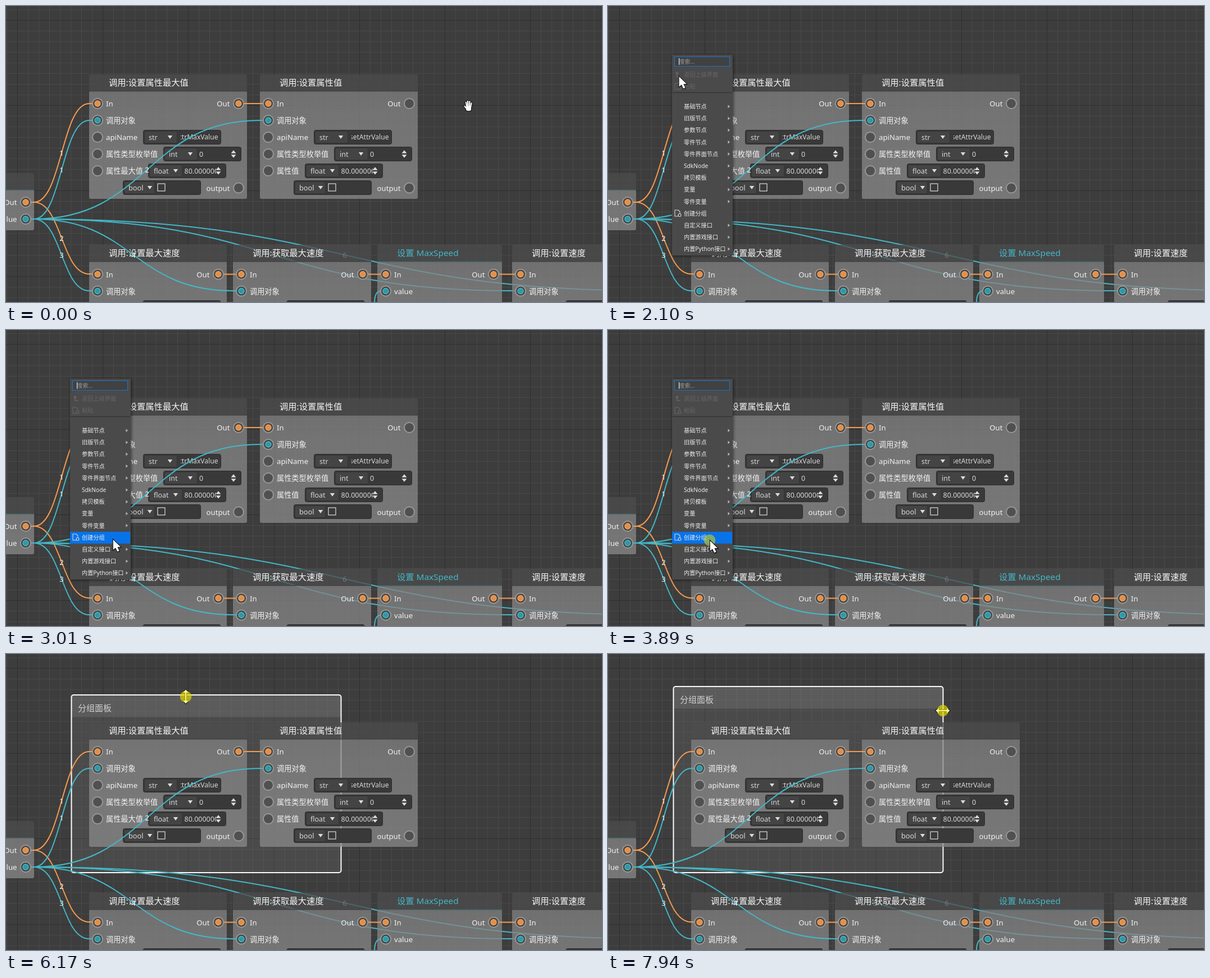
An HTML page with a canvas that plays this animation: 1061x528 px, repeating every 8 s.

```html
<!DOCTYPE html>
<html lang="zh-CN">
<head>
<meta charset="utf-8">
<style>
html, body { margin: 0; width: 100%; height: 100%; overflow: hidden; background: #3d3d3d; }
canvas { display: block; }
</style>
</head>
<body>
<canvas id="stage" width="1061" height="528"></canvas>
<script>
const W = 1061, H = 528, LOOP = 8000;
const ctx = document.getElementById('stage').getContext('2d');
const FONT = '"Noto Sans", "Noto Sans CJK SC", "Noto Sans CJK", sans-serif';
const ORANGE = '#f59b4f', TEAL = '#43b7c7';
const HEADER = 30;

// Cursor moves: start, end, number of steps, destination
const moves = [
  [70, 830, 11, 110, 72], [900, 970, 2, 108, 79], [1170, 1240, 2, 113, 85],
  [1570, 1570, 1, 114, 87], [2030, 2520, 8, 190, 330], [2590, 2800, 4, 188, 354],
  [2870, 3220, 6, 192, 392], [3290, 3360, 2, 181, 375], [4750, 5240, 7, 303, 77],
  [5310, 5440, 3, 308, 88], [5640, 5770, 2, 320, 89], [6030, 6170, 3, 320, 76],
  [6240, 6450, 4, 320, 61], [6520, 6790, 4, 323, 38], [7120, 7330, 4, 480, 112],
  [7400, 7610, 4, 596, 101]
];
const menuItems = ['基础节点', '旧版节点', '参数节点', '零件节点', '零件界面节点', 'SdkNode',
  '拷贝模板', '变量', '零件变量', '创建分组', '自定义接口', '内置游戏接口', '内置Python接口'];
const GROUP_ITEM = 9;

function cursorAt(t) {
  let x = 823, y = 178;
  for (const [start, end, steps, toX, toY] of moves) {
    if (t < start) break;
    const step = end > start ? Math.floor((t - start) / (end - start) * (steps - 1) + 1e-6) + 1 : steps;
    const p = Math.min(1, step / steps), e = p * p * (3 - 2 * p);
    x += (toX - x) * e;
    y += (toY - y) * e;
  }
  return { x, y };
}

function text(s, x, y, size = 13.2, color = '#f2f2f2', align = 'left') {
  ctx.font = `${size}px ${FONT}`;
  ctx.fillStyle = color;
  ctx.textAlign = align;
  ctx.fillText(s, x, y + size * 0.37);
}

function box(x, y, w, h, r, fill, stroke, line = 1) {
  ctx.beginPath();
  ctx.roundRect(x, y, w, h, r);
  if (fill) { ctx.fillStyle = fill; ctx.fill(); }
  if (stroke) { ctx.strokeStyle = stroke; ctx.lineWidth = line; ctx.stroke(); }
}

function disc(x, y, r, fill, stroke, line) {
  ctx.beginPath();
  ctx.arc(x, y, r, 0, Math.PI * 2);
  ctx.fillStyle = fill;
  ctx.fill();
  if (stroke) { ctx.strokeStyle = stroke; ctx.lineWidth = line; ctx.stroke(); }
}

function poly(points, fill, stroke, line = 1) {
  ctx.beginPath();
  points.forEach(([x, y]) => ctx.lineTo(x, y));
  ctx.closePath();
  if (stroke) { ctx.strokeStyle = stroke; ctx.lineWidth = line; ctx.stroke(); }
  ctx.fillStyle = fill;
  ctx.fill();
}

const triangle = (x, y, w, h, fill = '#dcdcdc') =>
  poly([[x - w, y - h / 2], [x + w, y - h / 2], [x, y + h / 2]], fill);

function gridLines(step, color, x0, y0) {
  ctx.beginPath();
  for (let x = x0; x < W; x += step) { ctx.moveTo(Math.round(x) + 0.5, 0); ctx.lineTo(Math.round(x) + 0.5, H); }
  for (let y = y0; y < H; y += step) { ctx.moveTo(0, Math.round(y) + 0.5); ctx.lineTo(W, Math.round(y) + 0.5); }
  ctx.strokeStyle = color;
  ctx.lineWidth = 1;
  ctx.stroke();
}

function background() {
  const major = 152.2, minor = major / 8;
  ctx.fillStyle = '#3d3d3d';
  ctx.fillRect(0, 0, W, H);
  gridLines(minor, '#494949', 20 - minor, 25 - minor);
  gridLines(major, '#2f2f2f', 20, 25);
}

// Runs from rim to rim: straight inside each node, curved between the node edges
function wire(x0, y0, x1, y1, color, label) {
  const mid = (x0 + x1) / 2, inset = 5;
  ctx.beginPath();
  ctx.moveTo(x0 - inset, y0);
  ctx.lineTo(x0, y0);
  ctx.bezierCurveTo(mid, y0, mid, y1, x1, y1);
  ctx.lineTo(x1 + inset, y1);
  ctx.strokeStyle = color;
  ctx.lineWidth = 2;
  ctx.stroke();
  if (label) text(label, mid, (y0 + y1) / 2, 13, '#f5f5f5', 'center');
}

function node(x, y, w, h, title, accent) {
  const fill = ctx.createLinearGradient(0, y, 0, y + h);
  fill.addColorStop(0, 'rgba(124,124,124,.75)');
  fill.addColorStop(0.3, 'rgba(133,133,133,.75)');
  fill.addColorStop(1, 'rgba(138,138,138,.75)');
  box(x, y + HEADER, w, h - HEADER, [0, 0, 3, 3], fill);
  box(x, y, w, HEADER, [3, 3, 0, 0], 'rgba(77,77,77,.75)');
  ctx.fillStyle = accent ? '#3b5a5d' : '#414141';
  ctx.fillRect(x, y + HEADER - 1, w, 1.5);
  text(title, x + 35, y + 14.5, 15.3, accent || '#f4f4f4');
}

function port(x, y, label, color, isOut) {
  disc(x, y, 9, color ? '#434343' : '#505050', '#979797', 2);
  if (color) disc(x, y, 4.9, color === ORANGE ? '#dd9150' : '#3496a3', color, 1.6);
  text(label, isOut ? x - 15.5 : x + 15, y + 0.5, 13.2, '#f2f2f2', isOut ? 'right' : 'left');
}

function field(x, y, type, split, arrowX) {
  box(x + 0.5, y + 0.5, 138, 25, 3, '#393939', '#2a2a2a');
  box(x + 2.5, y + 2.5, split - 4, 21, 2, '#444', '#343434');
  text(type, x + 10, y + 13, 12.5, '#d8d8d8');
  triangle(x + arrowX, y + 13, 4.2, 6);
}

function clipped(x, y, w, draw) {
  ctx.save();
  ctx.beginPath();
  ctx.rect(x, y, w, 26);
  ctx.clip();
  draw();
  ctx.restore();
}

function spinner(x, y) {
  triangle(x, y - 4, 4.5, -5.5);
  triangle(x, y + 4, 4.5, 5.5);
}

function attributeNode(x, title, valueLabel, floatX, apiText, chained) {
  node(x, 122, 281, 222, title);
  port(x + 15, 174, 'In', ORANGE);
  port(x + 266, 174, 'Out', chained && ORANGE, true);
  port(x + 15, 204, '调用对象', TEAL);
  port(x + 15, 234, 'apiName');
  port(x + 15, 264, '属性类型枚举值');
  port(x + 15, 294, valueLabel);
  port(x + 266, 324.5, 'output', null, true);

  field(x + 96, 221, 'str', 62, 48);
  clipped(x + 163, 221, 70, () => text(apiText, x + 229.5, 234, 12.1, '#d8d8d8', 'right'));
  field(x + 132, 251, 'int', 62, 48);
  text('0', x + 196, 264, 12.5, '#d8d8d8');
  spinner(x + 257, 264);
  field(floatX, 281, 'float', 62, 49);
  clipped(floatX + 63, 281, 58, () => text('80.000000', floatX + 64.5, 294, 12.5, '#d8d8d8'));
  spinner(floatX + 125, 294);
  field(x + 60, 311, '', 58, 48);
  clipped(x + 68, 311, 28, () => text('bool', x + 70, 324, 12.8, '#d8d8d8'));
  ctx.strokeStyle = '#dedede';
  ctx.lineWidth = 1.2;
  ctx.strokeRect(x + 122, 317, 13, 13);
}

function lowerNode(x, w, title, input, accent) {
  node(x, 426, w, 200, title, accent);
  port(x + 15, 478.5, 'In', ORANGE);
  port(x + 15, 508.5, input, TEAL);
  port(x + w - 15, 478.5, 'Out', ORANGE, true);
  if (!accent) box(x + 96, 525.5, 138, 25, 3, '#393939', '#2a2a2a');
}

function groupPanel(top, selected) {
  box(116, top, 481, 390 - top, 4, 'rgba(125,125,125,.2)');
  box(116, top, 481, 39.5, [4, 4, 0, 0], 'rgba(150,150,150,.22)');
  if (selected) box(116.5, top, 480, 390 - top, 4, null, '#fafafa', 2);
  text('分组面板', 128, top + 23, 15, '#d0d0d0');
}

function graph() {
  wire(50, 380, 901, 508, TEAL, '5');
  wire(50, 380, 1156, 508, TEAL, '6');
  node(-160, 298, 210, 102, '', '#3b5a5d');
  attributeNode(148, '调用:设置属性最大值', '属性最大值', 253, 'setAttrMaxValue', true);
  attributeNode(452, '调用:设置属性值', '属性值', 532, 'setAttrValue', false);
  lowerNode(148, 245, '调用:设置最大速度', '调用对象');
  lowerNode(404, 246, '调用:获取最大速度', '调用对象');
  lowerNode(661, 222, '设置 MaxSpeed', 'value', TEAL);
  lowerNode(901, 246, '调用:设置速度', '调用对象');
  port(35, 350, 'Out', ORANGE, true);
  port(35, 380, 'value', TEAL, true);

  wire(50, 350, 148, 174, ORANGE, '1');
  wire(50, 350, 148, 478, ORANGE, '2');
  wire(50, 380, 148, 204, TEAL, '1');
  wire(50, 380, 452, 204, TEAL, '2');
  wire(50, 380, 148, 508, TEAL, '3');
  wire(50, 380, 404, 508, TEAL, '4');
  wire(429, 174, 452, 174, ORANGE);
  for (const [x0, x1] of [[393, 404], [650, 661], [883, 901]]) wire(x0, 478.5, x1, 478.5, ORANGE);
  ctx.beginPath();
  ctx.moveTo(656, 530);
  ctx.quadraticCurveTo(656, 510, 666, 508.5);
  ctx.strokeStyle = TEAL;
  ctx.stroke();
}

function pageIcon(x, y, color) {
  ctx.strokeStyle = color;
  ctx.lineWidth = 1.1;
  ctx.beginPath();
  ctx.moveTo(x + 1, y + 5);
  ctx.lineTo(x - 5, y + 5);
  ctx.lineTo(x - 5, y - 6);
  ctx.lineTo(x + 1, y - 6);
  ctx.lineTo(x + 4, y - 3);
  ctx.lineTo(x + 4, y);
  ctx.moveTo(x + 6, y + 3);
  ctx.arc(x + 3.5, y + 3, 2.5, 0, 7);
  ctx.stroke();
}

function menuPanel(x, y, w, h) {
  ctx.save();
  ctx.shadowColor = 'rgba(0,0,0,.55)';
  ctx.shadowBlur = 5;
  ctx.shadowOffsetX = ctx.shadowOffsetY = 1;
  box(x, y, w, h, 0, '#4a4a4a');
  ctx.restore();
}

function menu(t, pointer) {
  const rowH = 21.2, firstY = 179.2, dim = '#666';
  menuPanel(114, 87, 108, 358);
  box(118.5, 90.5, 98, 17, 0, '#414141', '#1874c4', 1.2);
  text('搜索...', 126, 99, 10.2, '#989898');
  if ((t - 1700) % 1060 < 530) {
    ctx.fillStyle = '#e4e4e4';
    ctx.fillRect(126, 93, 1, 12);
  }
  text('返回上级界面', 135, 122, 10.2, dim);
  text('粘贴', 135, 143.5, 10.2, dim);
  ctx.strokeStyle = dim;
  ctx.lineWidth = 1.5;
  ctx.beginPath();
  ctx.moveTo(129, 126);
  ctx.lineTo(123, 126);
  ctx.lineTo(123, 119);
  ctx.stroke();
  poly([[119.5, 121], [123, 117], [126.5, 121]], dim);
  pageIcon(124, 144, dim);
  ctx.fillStyle = '#2c2c2c';
  ctx.fillRect(115, 154, 106, 1);

  const hover = Math.floor((pointer.y - firstY) / rowH + 0.5);
  menuItems.forEach((item, i) => {
    const y = firstY + i * rowH;
    if (i === hover) {
      ctx.fillStyle = '#0873e8';
      ctx.fillRect(114, Math.round(y - 10), 107, 21);
    }
    text(item, 135, y, 10.2, '#ededed');
    if (i === GROUP_ITEM) pageIcon(124, y, '#d8d8d8');
    else poly([[213.5, y - 3], [217, y], [213.5, y + 3]], '#b5b5b5');
  });
}

function arrowCursor() {
  const shape = [[0.8, 1], [0.8, 19], [5, 15.4], [8.3, 22.3], [11.6, 20.8], [8.4, 14.2], [14, 14]];
  poly(shape.map(([x, y]) => [x + 1.5, y + 1.5]), 'rgba(0,0,0,.35)');
  poly(shape, '#fff', '#111', 2);
}

function handCursor() {
  const fingers = [[-4, -6, -2.5, 2], [-1, -8, -0.5, 2], [2.3, -7.5, 1.8, 2], [5.3, -4.5, 4, 3], [-6.2, 1, -3, 5]];
  ctx.lineCap = 'round';
  for (const [color, grow] of [['#151515', 2], ['#fff', 0]]) {
    ctx.strokeStyle = color;
    ctx.lineWidth = 2.3 + grow;
    for (const [x0, y0, x1, y1] of fingers) {
      ctx.beginPath();
      ctx.moveTo(x0, y0);
      ctx.lineTo(x1, y1);
      ctx.stroke();
    }
    const g = grow / 2;
    box(-4 - g, 1 - g, 9 + grow, 8 + grow, 3, color);
  }
  ctx.lineCap = 'butt';
}

function resizeCursor() {
  const half = [[-1, 7], [-5, 7], [0, 12.5], [5, 7], [1, 7]];
  const shape = [...half, ...half.map(([x, y]) => [-x, -y])];
  poly(shape, '#fff', '#111', 2);
}

function pointerShape(t) {
  if (t < 1570) return handCursor;
  return (t >= 5770 && t < 6520) || t >= 7540 ? resizeCursor : arrowCursor;
}

function drawPointer(t, { x, y }) {
  const shape = pointerShape(t);
  const pressed = (t >= 3820 && t < 4090) || (t >= 6030 && t < 6520) || t >= 7940;
  ctx.save();
  ctx.translate(x, y);
  if (shape === resizeCursor && t >= 7540) ctx.rotate(Math.PI / 2);
  shape();
  if (pressed) disc(0, 0, 10.3, shape === arrowCursor ? 'rgba(200,205,35,.62)' : 'rgba(222,215,0,.7)');
  if (pressed && shape === arrowCursor) shape();
  if (pressed && shape === resizeCursor) {
    ctx.globalAlpha = 0.75;
    poly([[-1, 7], [-4, 7], [0, 11.5], [4, 7], [1, 7], [1, -7], [4, -7], [0, -11.5], [-4, -7], [-1, -7]], '#fffb9a');
  }
  ctx.restore();
}

function draw(t) {
  const pointer = cursorAt(t);
  background();
  if (t >= 4020) {
    const top = t < 6030 ? 90 : t < 6450 ? Math.min(90, pointer.y - 3) : 58;
    groupPanel(top, t >= 6030);
  }
  graph();
  if (t >= 1700 && t < 4020) menu(t, pointer);
  if (t >= 3220 && t < 3820) menuPanel(222, 381, 183, 160);
  drawPointer(t, pointer);
}

const startTime = performance.now();
function tick() {
  draw((performance.now() - startTime) % LOOP);
  requestAnimationFrame(tick);
}
tick();
</script>
</body>
</html>
```
